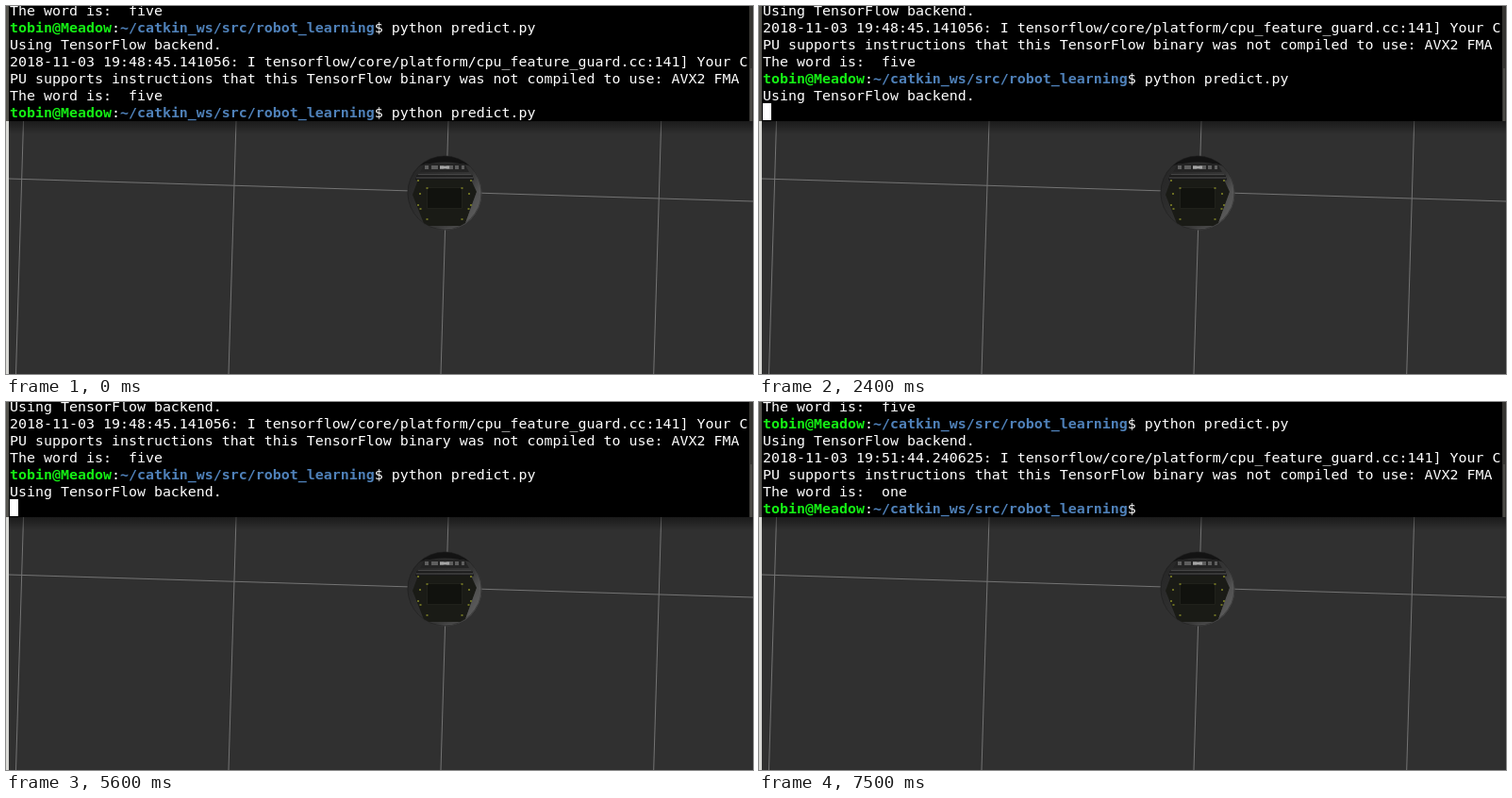
Recreate the animation shown at these times as an HTML page. Size 792 px wide and 390 px high, loop 8 s.

```html
<!DOCTYPE html>
<html lang="en">
<head>
<meta charset="utf-8">
<title>Word prediction</title>
<style>
html, body { margin: 0; width: 100%; height: 100%; overflow: hidden; background: #303030; }
svg { position: absolute; left: 0; top: 0; }
#term { position: absolute; left: 3px; top: 0; width: 789px; height: 122px; overflow: hidden; background: #000; }
pre {
  position: absolute; left: 1px; top: -4px; margin: 0; color: #fff;
  font: 14.95px/18px "DejaVu Sans Mono", monospace;
  font-variant-ligatures: none;
}
pre b:first-child { color: #14f014; }
b { color: #4f81b9; }
pre div { height: 18px; }
#cursor { position: absolute; width: 9px; height: 18px; top: 103px; background: #fff; }
#bar { position: absolute; left: 785px; top: 0; width: 4px; height: 122px; background: #353431; }
#bar i { position: absolute; left: 1px; top: 66px; width: 2px; height: 56px; background: #4c4b47; }
</style>
</head>
<body>
<svg width="792" height="390" viewBox="0 0 792 390">
  <defs>
    <linearGradient id="shade" x2="0" y2="1">
      <stop stop-color="#000" stop-opacity=".45"/>
      <stop offset="1" stop-color="#000" stop-opacity="0"/>
    </linearGradient>
    <linearGradient id="rim" x2="1" y2=".7">
      <stop offset=".1" stop-color="#262626"/>
      <stop offset=".7" stop-color="#353535"/>
      <stop offset="1" stop-color="#6c6c6c"/>
    </linearGradient>
    <clipPath id="disc"><circle cx="465" cy="198" r="39"/></clipPath>
  </defs>
  <rect width="792" height="390" fill="#303030"/>
  <path id="grid" fill="none" stroke="#747474"/>
  <rect y="122" width="792" height="14" fill="url(#shade)"/>
  <rect width="3" height="390" fill="#d9d9d5"/>
  <rect width="3" height="122" fill="#55544f"/>
  <circle cx="465" cy="198" r="39.5" fill="url(#rim)"/>
  <g clip-path="url(#disc)">
    <path d="M436 158H494V170Q465 161 436 170Z" fill="#131313"/>
    <path d="M444 167H486L491 176H439Z" fill="#242424"/>
    <path d="M444 171H486" stroke="#5e5e5e" stroke-width="4" stroke-dasharray="4 3 7 2"/>
    <path d="M460 171H470" stroke="#a5a5a5" stroke-width="3"/>
    <path d="M437 178.500H493" stroke="#444"/>
    <path d="M435 180.500H495M434 183.500H496" stroke="#1a1a1a" stroke-width="2"/>
    <path d="M435 182H495" stroke="#484848"/>
    <path d="M437 184H493L499 197L486 233H444L431 200Z" fill="#1a1b16"/>
    <path d="M446.500 192.500H483.500V214.500H446.500Z" fill="#11120e" stroke="#20211b"/>
    <path d="M499 197L486 233L494 230L505 200Z" fill="#505050" opacity=".6"/>
    <path d="M444 234H486" stroke="#393939"/>
    <g id="screws" fill="#6b6e22"/>
  </g>
  <circle cx="465" cy="198" r="39" fill="none" stroke="#1d1d1d" stroke-opacity=".5"/>
</svg>
<div id="term">
  <pre id="text"></pre>
  <div id="cursor"></div>
  <div id="bar"><i></i></div>
</div>
<script>
const $ = id => document.getElementById(id);

$("grid").setAttribute("d", "M3 183L792 207" +
  [18.5, 244, 469, 694.7].map(x => `M${x} 122l-8 268`).join(""));

// Half-widths of the screw rows, by height
$("screws").innerHTML = [[185, 28], [193, 18.5], [199, 26], [211, 28], [215, 25.5], [226, 18.5]]
  .map(([y, w]) => [-w, w].map(dx =>
    `<rect x="${464 + dx}" y="${y - 1}" width="2" height="2"/>`).join("")).join("");

const prompt = "<b>tobin@Meadow</b>:<b>~/catkin_ws/src/robot_learning</b>$ ";
const run = prompt + "python predict.py";
const using = "Using TensorFlow backend.";
const guard = time => `2018-11-03 ${time}: I tensorflow/core/platform/cpu_feature_guard.cc:141] Your C`;
const support = "PU supports instructions that this TensorFlow binary was not compiled to use: AVX2 FMA";
const word = w => "The word is:  " + w;
const log = [
  word("five"), run, using, guard("19:48:45.141056"), support, word("five"),
  run, using, guard("19:51:44.240625"), support, word("one"), prompt
];

// [start ms, first line, end line, cursor column]
const screens = [
  [0, 0, 7, 63], [2100, 1, 7, 0], [2400, 2, 8, 0],
  [5700, 4, 10, 0], [7000, 5, 11, 0], [7300, 5, 12, 45]
];
// Cursor visibility flips at each of these times, starting hidden
const blinks = [200, 700, 1200, 1800, 2100, 2600, 3300, 3900, 4400, 5000, 5600, 6300, 6900, 7500];

let shown;
function draw(now) {
  const t = now % 8000;
  const screen = screens.findLast(s => s[0] <= t);
  if (screen !== shown) {
    shown = screen;
    const [, first, end, column] = screen;
    $("text").innerHTML = log.slice(first, end).map(s => `<div>${s}</div>`).join("");
    $("cursor").style.left = 1 + column * 9 + "px";
  }
  const on = blinks.filter(b => b <= t).length % 2;
  $("cursor").style.visibility = on ? "visible" : "hidden";
}

const start = performance.now();
function tick() {
  draw(performance.now() - start);
  requestAnimationFrame(tick);
}
tick();
</script>
</body>
</html>
```
